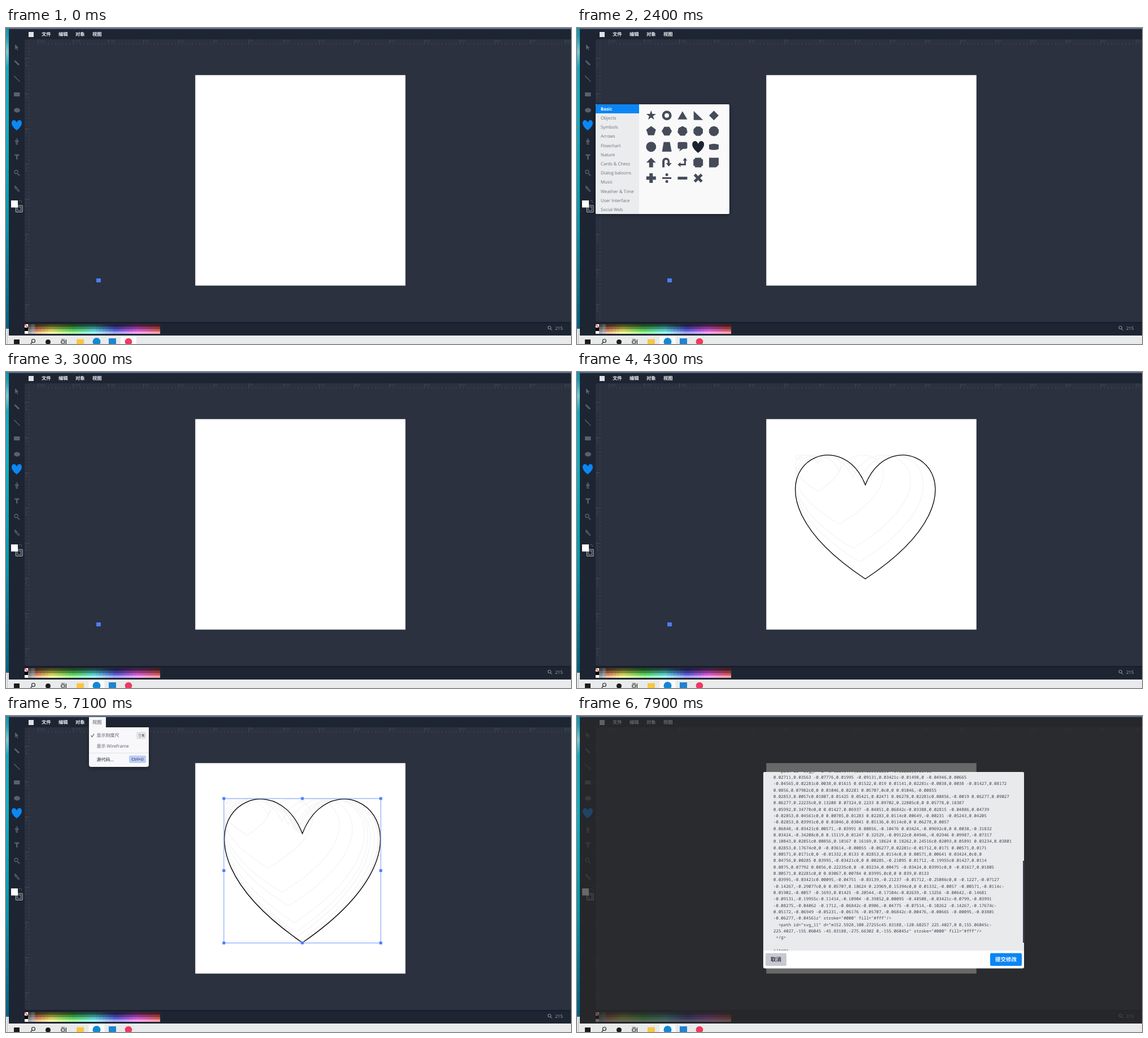
Recreate the animation shown at these times as an HTML page. Size 1001x559 px, loop 8 s.

```html
<!DOCTYPE html>
<html lang="zh-CN">
<head>
<meta charset="utf-8">
<style>
html, body { margin: 0; width: 100%; height: 100%; overflow: hidden; background: #1e2532 }
svg { display: block }
text { font-family: "Open Sans", "Noto Sans CJK SC", "Noto Sans CJK", "DejaVu Sans", sans-serif; white-space: pre; text-rendering: geometricPrecision }
.ruler text { font-size: 5px; fill: #4e5564 }
#menubar text { font-size: 8.4px; font-weight: 700 }
#menu text { font-size: 8px; fill: #555a64 }
#menu .key { font-size: 7px; font-weight: 600; fill: #3a3f4a; text-anchor: middle }
#panel text { font-size: 7.8px }
#code text { font-family: "Noto Sans Mono", monospace; font-size: 7.42px; fill: #3b404d }
.button { font-size: 9.5px; font-weight: 700; text-anchor: middle }
</style>
</head>
<body>
<svg width="1001" height="559" viewBox="0 0 1001 559">
  <defs>
    <linearGradient id="sea" x2="0" y2="1">
      <stop stop-color="#1593aa"/><stop offset=".03" stop-color="#1b9fb4"/>
      <stop offset=".08" stop-color="#7cc8d3"/><stop offset=".13" stop-color="#16a9bb"/>
      <stop offset=".3" stop-color="#10b0c3"/><stop offset=".65" stop-color="#0797ab"/>
      <stop offset=".9" stop-color="#056e8c"/><stop offset="1" stop-color="#055f80"/>
    </linearGradient>
    <filter id="shadow" x="-20%" y="-20%" width="140%" height="140%">
      <feDropShadow dx="0" dy="2" stdDeviation="4" flood-opacity=".4"/>
    </filter>
    <clipPath id="codeClip"><path d="M330 99H790V415H330z"/></clipPath>
  </defs>

  <path fill="#1e2532" d="M0 0H1001V559H0z"/>
  <path fill="#596b85" d="M5 0H1001V2H5z"/>
  <path fill="url(#sea)" d="M0 0H5V532H0z"/>
  <path fill="#e9eaeb" d="M0 532H5V544H1001V559H0z"/>
  <path fill="#bfc3c6" d="M2 532h1v27h-1z"/>
  <path fill="#171d28" d="M33 519H1001V522H33z"/>
  <path fill="#2b313f" d="M37 20H1001V520H37Q33 520 33 516V24Q33 20 37 20z"/>
  <g id="rulers" class="ruler"></g>
  <path fill="#fff" stroke="#20252f" stroke-width=".6" d="M335 83H708V456H335z"/>

  <g id="menubar" fill="#eef0f3">
    <path fill="#dfe3e8" d="M40 7h9v9h-9z"/>
    <text x="63" y="14">文件</text><text x="93" y="14">编辑</text><text x="123" y="14">对象</text>
    <text x="153" y="14" id="view">视图</text>
  </g>

  <g fill="#5a606e">
    <path d="M16 29L22.5 35H19.8L21.5 38.5 20 39.2 18.4 35.8 16 38z"/>
    <path d="M14.5 57L17.5 58 24 64.5 22 66.5 15.5 60z"/>
    <path d="M14 84.500L24.500 95" stroke="#5a606e" stroke-width="1.200"/>
    <path d="M14 114H24.500V121H14z"/>
    <ellipse cx="19.500" cy="145.500" rx="5.500" ry="4"/>
    <path id="tool" fill="#0a88f5"/>
    <path d="M19.200 194.500L22.300 200 20.800 203H17.600L16 200zM17 204H21.400V206H17z"/>
    <path d="M18.800 196V200.500" stroke="#1e2532" stroke-width=".8"/>
    <path d="M15 223.500H23.500V225.800H20.500V232.500H18V225.800H15z"/>
    <path d="M20.500 258L24 261" stroke="#5a606e" stroke-width="1.800"/>
    <circle cx="18" cy="254.500" r="3" fill="none" stroke="#5a606e" stroke-width="1.300"/>
    <path d="M17 281L23.500 287.500V289H22L15.500 282.500z" fill="none" stroke="#5a606e" stroke-width="1.200"/>
    <path d="M14.500 279.500L16.500 279 20 282.500 18.500 284z"/>
    <path d="M17.500 314H29V325.500H17.500z" fill="#111620" stroke="#c9ccd1"/>
    <path d="M20 316.500H26.500V323H20z" fill="#1e2532" stroke="#c9ccd1" stroke-width=".8"/>
    <path d="M9 305H21V317.500H9z" fill="#fff"/>
    <path d="M23.500 305.500H26Q28 306 28 309" fill="none" stroke="#5a606e"/>
  </g>

  <g id="palette"></g>
  <g stroke="#a3a8b1" fill="none"><circle cx="962.700" cy="530" r="2.600"/><path d="M964.700 532L967.500 535"/></g>
  <text x="973" y="534" font-size="7.800" fill="#a9aeb7">215</text>

  <path id="active" fill="#fafbfc" d="M0 544.500H28V559H0z"/>
  <g fill="#1c1c1c">
    <path d="M14 551H24V559H14z"/>
    <g fill="none" stroke="#1c1c1c" stroke-width="1.100"><circle cx="48.500" cy="553.500" r="3"/><path d="M46.300 556L43.500 559M98 553.500H104V557.500H98zM98 551H104M106.500 551V559"/></g>
    <circle cx="74.500" cy="555.500" r="4.500"/>
    <path fill="#f8c640" d="M125 550.500H138V559H125z"/>
    <circle cx="160.500" cy="555" r="7" fill="#1487d4"/>
    <path fill="#1f83d1" d="M182 549H195V559H182z"/>
    <circle cx="217" cy="555" r="6.300" fill="#f0395f"/>
  </g>

  <path id="mark" fill="#4c7df5" d="M160 443H168V450H160z"/>
  <g id="hearts" fill="none" stroke-width="1.300"></g>
  <g id="selection" fill="#4c7fff">
    <path d="M386 146H664V401.500H386z" fill="none" stroke="#6f98fb"/>
  </g>

  <g id="panel">
    <rect x="33" y="135" width="237" height="194" rx="2" fill="#f9f9fa" filter="url(#shadow)"/>
    <path fill="#ebecee" d="M33 135H110V329H35Q33 329 33 327z"/>
    <path fill="#0a86f4" d="M35 135H110V151H33V137Q33 135 35 135z"/>
  </g>

  <g id="menu">
    <path fill="#f8f8fa" filter="url(#shadow)" d="M147 20H253V86Q253 90 249 90H151Q147 90 147 86z"/>
    <path fill="#f8f8fa" d="M147 2H177V21H147z"/>
    <path stroke="#dfe1e5" d="M147 65.500H253"/>
    <text x="153" y="14" style="font-size:8.400px">视图</text>
    <path d="M150.500 34.500L152.500 37 156 31.500" fill="none" stroke="#454a55" stroke-width="1.100"/>
    <text x="160.500" y="37">显示刻度尺</text>
    <text x="160.500" y="55.700">显示 Wireframe</text>
    <text x="160.500" y="79.500" id="source">源代码...</text>
    <rect x="231" y="28" width="17" height="13" rx="2" fill="#e3e4e7"/>
    <text class="key" x="239.500" y="37">⇧R</text>
    <rect x="218" y="70" width="30" height="13" rx="2" id="badge"/>
    <text class="key" x="233" y="79">Ctrl+U</text>
  </g>

  <g id="dialog">
    <path fill="#282828" fill-opacity=".7" d="M5 2H1001V544H5z"/>
    <rect x="330" y="99" width="462" height="347.500" rx="3" fill="#fff"/>
    <path fill="#e9eaec" d="M333 99H789Q792 99 792 102V415H330V102Q330 99 333 99z"/>
    <g clip-path="url(#codeClip)"><g id="code"></g></g>
    <path id="thumb" fill="#3b4150" d="M790 99H792.500V244H790z"/>
    <rect x="334" y="419.500" width="37" height="22.500" rx="2" fill="#c8c9d0"/>
    <text class="button" x="352.500" y="434" fill="#333843">取消</text>
    <rect x="732" y="419.500" width="56" height="22.500" rx="2" fill="#0a86f4"/>
    <text class="button" x="760" y="434" fill="#fff">提交修改</text>
  </g>
</svg>

<script>
const $ = id => document.getElementById(id);
const add = (id, markup) => $(id).insertAdjacentHTML('beforeend', markup);
const range = (n, fn) => Array.from({ length: n }, (_, i) => fn(i));
const box = (x, y, w, h, fill) => `<rect x="${x}" y="${y}" width="${w}" height="${h}" fill="${fill}"/>`;

function heart(x, y, w, h) {
  const sx = w / 222.3, sy = h / 204.2;
  return `M${x + w / 2} ${y + 49.1 * sy}c${45.8 * sx} ${-120.6 * sy} ${225.4 * sx} 0 0 ${155.1 * sy}` +
    `c${-225.4 * sx} ${-155.1 * sy} ${-45.8 * sx} ${-275.7 * sy} 0 ${-155.1 * sy}z`;
}

function polygon(n, turn = -90, inner = 9) {
  return 'M' + range(n, i => {
    const a = (turn + i * 360 / n) * Math.PI / 180, r = i % 2 ? inner : 9;
    return `${r * Math.cos(a)} ${r * Math.sin(a)}`;
  }).join('L') + 'z';
}

// Rulers: a major tick every 50 units, ten divisions each
const pitch = 62.25;
let ticks = '', labels = '';
for (let i = 0; i < 16; i++) {
  const x = 57 + i * pitch, y = 54 + (i - 1) * pitch, value = i * 50;
  ticks += `M${x} 20V29`;
  labels += `<text x="${x + 1.5}" y="25">${value - 223}</text>`;
  if (i && i < 9) {
    ticks += `M33 ${y}H42`;
    labels += [...String(value - 73)].map((c, k) => `<text x="34.5" y="${y + 5 + k * 4.5}">${c}</text>`).join('');
  }
  for (let k = 1; k < 10; k++) {
    ticks += `M${x + k * pitch / 10} 26.500v2.500`;
    const minor = y + k * pitch / 10;
    if (minor > 29 && minor < 518) ticks += `M39.500 ${minor}h2.500`;
  }
}
add('rulers', `<path d="${ticks}" stroke="#4a5160" stroke-width=".8"/>${labels}`);

// Colour swatches
const tones = [[45, 21], [42, 38], [58, 58], [85, 80]];
add('palette', box(33, 524, 6, 6, '#fff') + '<path d="M33 524l6 6" stroke="#e02020" stroke-width="1.300"/>' +
  box(33, 530, 6, 6, '#000') + box(33, 536, 6, 5, '#fff') +
  range(39, c => tones.map(([s, l], r) => box(39 + c * 6, 524 + r * 4.25, 6.1, 4.3,
    c < 2 ? `hsl(0 0% ${27 + r * 13 + c * 8}%)` : `hsl(${18 + (c - 2) * 9.5} ${s}% ${l}%)`)).join('')).join(''));

$('tool').setAttribute('d', heart(10, 163, 18, 18));

for (const x of [386, 525, 664]) for (const y of [146, 273.5, 401.5])
  if (x !== 525 || y !== 273.5) add('selection', box(x - 2.5, y - 2.5, 5, 5, '#4c7fff'));

// Shape library
const topics = ['Basic', 'Objects', 'Symbols', 'Arrows', 'Flowchart', 'Nature', 'Cards &amp; Chess', 'Dialog baloons',
  'Music', 'Weather &amp; Time', 'User Interface', 'Social Web'];
add('panel', topics.map((name, i) => `<text x="42" y="${145.800 + i * 16.2}" ${
  i ? 'fill="#6b707c"' : 'fill="#fff" font-weight="700"'}>${name}</text>`).join(''));
const shapes = [
  polygon(10, -90, 3.6),
  'M-8.500 0a8.500 8.500 0 1 0 17 0a8.500 8.500 0 1 0-17 0M-4 0a4 4 0 1 1 8 0a4 4 0 1 1-8 0',
  'M0-7.500L8.500 7H-8.500z', 'M-8-8L8.500 8H-8z', 'M0-8.500L8.500 0 0 8.500-8.500 0z',
  polygon(5), polygon(6, 0), polygon(7), polygon(8, 22.5), polygon(10),
  polygon(12, 15), 'M-5.500-8.500H5.500L8.500 8.500H-8.500z',
  'M-6-8.500H6Q8.500-8.500 8.500-6V1Q8.500 3.500 6 3.500H1L-6 8-4 3.500H-6Q-8.500 3.500-8.500 1V-6Q-8.500-8.500-6-8.500z',
  heart(-8.7, -8.5, 17.4, 17.4), 'M-8.500-4Q0-7 8.500-4V4Q0 7-8.500 4z',
  'M0-8.500L8.500 0H3.500V8.500H-3.500V0H-8.500z',
  'M-8 8.500V-2A6 6 0 0 1 5-2V1H8.500L3.500 7-1.500 1H1.500V-2A2.700 2.700 0 0 0-4-2V8.500z',
  'M4.500-8.500L8.500-3.500H6V5H-3.500V8L-8.500 3.500-3.500-.5V2H3V-3.500H.5z',
  'M-5.500-8.500H5.500Q5.500-5.500 8.500-5.500V5.500Q5.500 5.500 5.500 8.500H-5.500Q-5.500 5.500-8.500 5.500V-5.500Q-5.500-5.500-5.500-8.500z',
  'M-8.500-8.500H8.500V4L4 8.500H-8.500z',
  'M-3-8.500H3V-3H8.500V3H3V8.500H-3V3H-8.500V-3H-3z',
  'M-8-1.500H8V1.500H-8zM-2.500-6a2.500 2.500 0 1 0 5 0a2.500 2.500 0 1 0-5 0M-2.500 6a2.500 2.500 0 1 0 5 0a2.500 2.500 0 1 0-5 0',
  'M-8.500-2.500H8.500V2.500H-8.500z',
  'M0-3.500L4.500-8 8-4.500 3.500 0 8 4.500 4.500 8 0 3.500-4.500 8-8 4.500-3.500 0-8-4.500-4.500-8z'
];
add('panel', shapes.map((d, i) => `<path class="shape" d="${d}" fill-rule="evenodd"/>`).join(''));
const icons = [...document.querySelectorAll('.shape')];

// Dragged heart: time, width, height
const drag = [
  [3800, 12, 8], [3900, 80, 64], [4000, 156, 122], [4100, 204, 165], [4200, 227, 189], [4300, 248, 219], [4400, 254, 235],
  [4500, 259, 243], [4600, 266, 251], [4700, 272, 254], [5000, 273, 254], [5100, 274.5, 253], [5200, 275.5, 252], [5300, 276.6, 254]
];
add('hearts', drag.map(([, w, h]) => `<path d="${heart(386.8, 147, w, h)}"/>`).join(''));
const trail = [...$('hearts').children];

// Code listing
let seed = 11;
const coord = () => {
  seed = seed * 16807 % 2147483647;
  return +(seed / 2147483647 * 0.4 - 0.2).toFixed(5);
};
const listing = [
  '<svg width="300" height="300">', ' <g>', '  <title>Layer 1</title>',
  ...range(26, () => range(5, i => `${coord()},${coord()}${i === 2 ? 'c' : ' '}`).join('')),
  '  <path id="svg_7" d="m-136.9477,290.03991c0,0 -0.00285,0.01711',
  ...`0.02711,0.03563 -0.07776,0.01995 -0.09131,0.03421c-0.01498,0 -0.04946,0.00665
-0.04565,0.02281c0.0038,0.01615 0.01522,0.019 0.01141,0.02281c-0.0038,0.0038 -0.01427,0.08172
0.0856,0.07982c0,0 0.01046,0.02281 0.05707,0c0,0 0.01046,-0.00855
0.02853,0.0057c0.01807,0.01425 0.05421,0.02471 0.06278,0.02281c0.00856,-0.0019 0.06277,0.09027
0.06277,0.22235c0,0.13208 0.07324,0.2233 0.09702,0.22805c0,0 0.05778,0.18387
0.05992,0.34778c0,0 0.01427,0.06937 -0.04851,0.06842c-0.03388,0.02815 -0.04886,0.04739
-0.02853,0.04561c0,0 0.00785,0.01283 0.02283,0.0114c0.00649,-0.00231 -0.05243,0.04205
-0.02853,0.03991c0,0 0.01046,0.03041 0.05136,0.0114c0,0 0.06278,0.0057
0.06848,-0.03421c0.00571,-0.03991 0.00856,-0.10476 0.03424,-0.09692c0,0 0.0038,-0.31832
0.03424,-0.34208c0,0 0.15119,0.01247 0.32529,-0.09122c0.04946,-0.02946 0.09987,-0.07317
0.10843,0.02851c0.00856,0.10167 0.16169,0.18624 0.18262,0.24516c0.02093,0.05891 0.03234,0.03801
0.02853,0.17674c0,0 -0.03614,-0.00855 -0.06277,0.02281c-0.01712,0.0171 0.00571,0.0171
0.00571,0.0171c0,0 -0.01332,0.0133 0.02853,0.0114c0,0 0.00571,0.00641 0.03424,0c0,0
0.04756,0.00285 0.03995,-0.03421c0,0 0.00285,-0.21095 0.01712,-0.19955c0.01427,0.0114
0.0875,0.07792 0.0856,0.22235c0,0 -0.03234,0.00475 -0.03424,0.03991c0,0 -0.01617,0.01805
0.00571,0.02281c0,0 0.03067,0.00784 0.03995,0c0,0 0.039,0.0133
0.03995,-0.03421c0.00095,-0.04751 -0.03139,-0.21237 -0.01712,-0.25086c0,0 -0.1227,-0.07127
-0.14267,-0.29077c0,0 0.05707,0.18624 0.23969,0.15394c0,0 0.01332,-0.0057 -0.00571,-0.0114c-
0.01902,-0.0057 -0.1693,0.01425 -0.20544,-0.17104c-0.02639,-0.13256 -0.00642,-0.14681
-0.09131,-0.19955c-0.11414,-0.10904 -0.39852,0.00095 -0.48508,-0.03421c-0.0799,-0.03991
-0.08275,-0.04062 -0.1712,-0.06842c-0.0906,-0.04775 -0.07514,-0.10262 -0.14267,-0.17674c-
0.05172,-0.06949 -0.05231,-0.06176 -0.05707,-0.06842c-0.00476,-0.00665 -0.00095,-0.03801
-0.06277,-0.04561z" stroke="#000" fill="#fff"/>
  <path id="svg_11" d="m152.5928,100.27255c45.83188,-120.60257 225.4027,0 0,155.06045c-
225.4027,-155.06045 -45.83188,-275.66302 0,-155.06045z" stroke="#000" fill="#fff"/>
 </g>

</svg>`.split('\n')
];
add('code', listing.map((line, i) =>
  `<text x="348" y="${119 + i * 11.34}">${line.replace(/</g, '&lt;')}</text>`).join(''));

const show = (id, opacity) => {
  $(id).style.opacity = +opacity;
  $(id).style.display = opacity > 0 ? '' : 'none';
};
const hovered = t => t >= 2400 ? 13 : t >= 2300 ? -1 : t >= 2000 ? 9 : t >= 1700 && t < 1800 ? 7 : -1;

function draw(now) {
  const t = Math.floor(now % 8000 / 100) * 100;

  $('active').setAttribute('transform', `translate(${t < 1100 ? 203 : 146.5})`);
  show('panel', t < 1100 ? 0 : t < 1200 ? 0.5 : t < 2700 ? 1 : Math.max(0, 0.8 - (t - 2700) * 0.8 / 300));
  icons.forEach((icon, i) => {
    const on = i === hovered(t);
    icon.setAttribute('fill', on ? '#1c2230' : '#454b59');
    icon.setAttribute('transform',
      `translate(${131.3 + i % 5 * 27.8} ${154.8 + Math.floor(i / 5) * 27.7}) scale(${on ? 1.2 : 1})`);
  });

  const last = drag.filter(step => step[0] <= t).length - 1;
  trail.forEach((path, i) => path.setAttribute('stroke', i > last ? 'none' : i < last ? '#f4f4f4' : '#000'));
  show('mark', t < 5500);
  show('selection', t >= 5500);

  $('view').setAttribute('fill', t < 6000 ? '#eef0f3' : '#fff');
  show('menu', t >= 6500 && t < 7200);
  $('source').style.fill = t < 6800 ? '#555a64' : '#1f2430';
  $('badge').setAttribute('fill', t < 6800 ? '#e3e4e7' : '#bccdf6');

  show('dialog', t < 7200 ? 0 : t < 7300 ? 0.5 : 1);
  const scroll = t < 7900 ? 0 : 348.2;
  $('code').setAttribute('transform', `translate(0 ${-scroll})`);
  $('thumb').setAttribute('transform', `translate(0 ${scroll * 0.451})`);
}

const start = performance.now();
(function tick() {
  draw(performance.now() - start);
  requestAnimationFrame(tick);
})();
</script>
</body>
</html>
```
